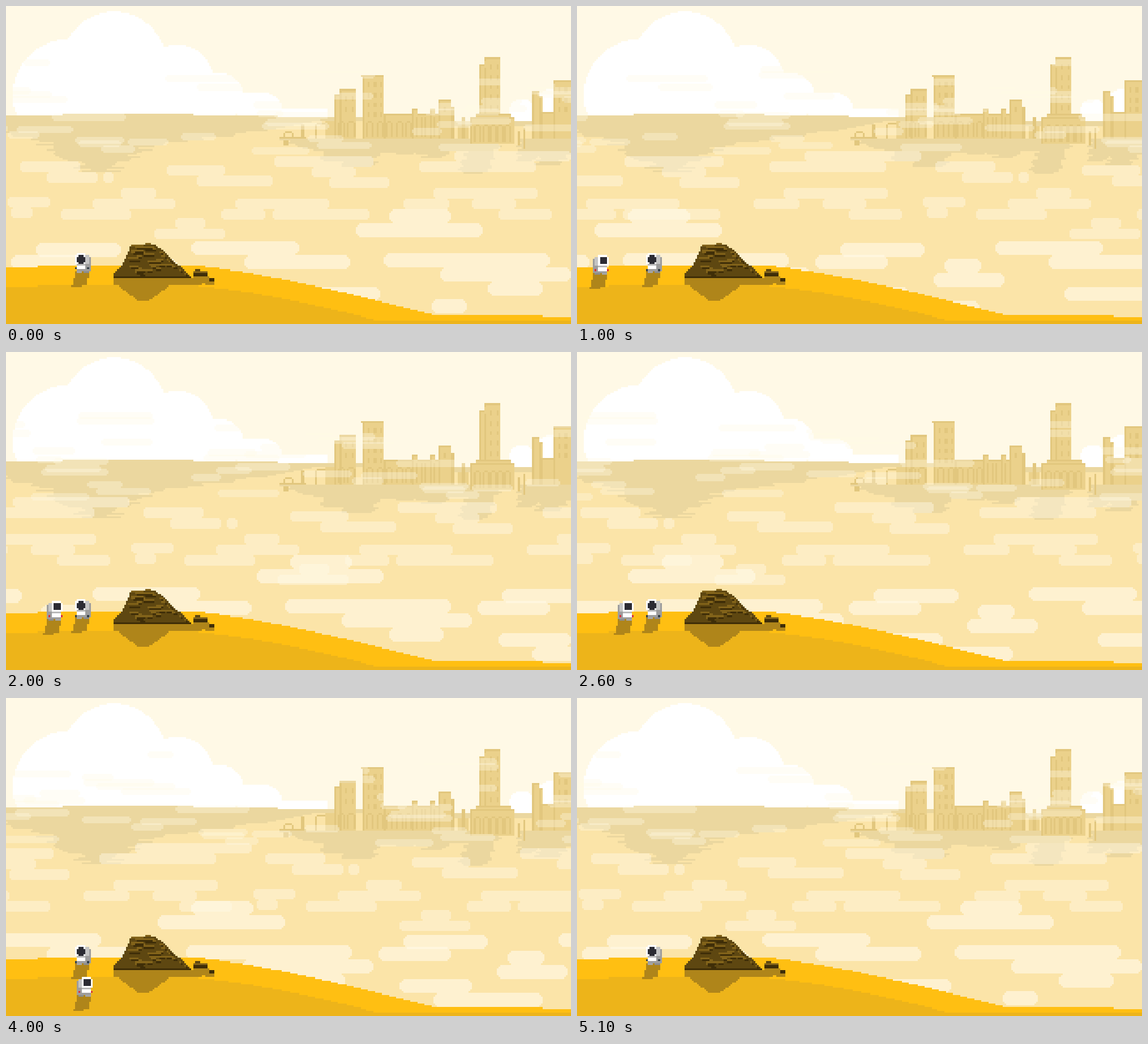
An HTML page with a canvas that plays this animation: 998x561 px, repeating every 5.2 s.

```html
<!DOCTYPE html>
<html lang="en">
<head>
<meta charset="utf-8">
<title>Desert walk</title>
<style>
html, body { margin: 0; width: 100%; height: 100%; overflow: hidden; background: #fff9e6; }
canvas { display: block; width: 998px; height: 561px; image-rendering: pixelated; }
</style>
</head>
<body>
<canvas id="stage" width="320" height="180"></canvas>
<script>
const W = 320, H = 180, UNIT = 998 / W, LAST = 51;
const SKY = '#fff9e6', SAND = '#fbe4a8', BANK = '#ebd79f', WALL = '#ebd18b', TRIM = '#e2c77e';
const DUNE = '#ffbf12', DUNE_LOW = '#edb41a', SHADOW = '#af851a';
const ROCK = '#5e4711', LEDGE = '#82631a', CRACK = '#3f2e08';

const stage = document.getElementById('stage').getContext('2d');
const px = v => Math.round(v / UNIT);
const clamp = v => Math.min(1, Math.max(0, v));

function layer() {
  const c = document.createElement('canvas');
  c.width = W;
  c.height = H;
  return c.getContext('2d');
}

function seeded(s) {
  return () => (s = s * 16807 % 2147483647) / 2147483647;
}

// Rectangle given by its edges in stage units, snapped to the pixel grid.
function box(g, color, x1, y1, x2, y2) {
  const x = px(x1), y = px(y1);
  g.fillStyle = color;
  g.fillRect(x, y, Math.max(1, px(x2) - x), Math.max(1, px(y2) - y));
}

// Piecewise linear curve through [x, y] points.
function curve(pts, x) {
  const i = pts.findIndex(p => p[0] >= x);
  if (i === 0) return pts[0][1];
  if (i < 0) return pts[pts.length - 1][1];
  const [x1, y1] = pts[i - 1], [x2, y2] = pts[i];
  return y1 + (y2 - y1) * (x - x1) / (x2 - x1);
}

// Fill row by row between two edge functions of y.
function rows(g, color, y1, y2, left, right) {
  g.fillStyle = color;
  for (let y = px(y1); y < px(y2); y++) {
    const s = (y + 0.5) * UNIT, a = px(left(s)), b = px(right(s));
    if (b > a) g.fillRect(a, y, b - a, 1);
  }
}

function disc(g, cx, cy, r) {
  const half = y => Math.sqrt(Math.max(0, r * r - (y - cy) ** 2));
  rows(g, '#fff', cy - r, Math.min(cy + r, 203), y => cx - half(y), y => cx + half(y));
}

function drawClouds(g) {
  disc(g, 191, 102, 92);
  disc(g, 110, 157, 98);
  disc(g, 303, 131, 63);
  disc(g, 378, 160, 42);
  disc(g, 453, 188, 36);
  box(g, '#fff', 100, 130, 400, 193);
  box(g, '#fff', 410, 153, 453, 193);
  box(g, '#fff', 470, 181, 568, 197);
  disc(g, 911, 186, 22);
  disc(g, 962, 176, 29);
  box(g, '#fff', 890, 180, 968, 203);
}

const BASE = 234;
// Left edge, roof height and right edge of each tower.
const towers = [
  [580, 156, 592], [590, 147, 617], [630, 122, 668], [668, 190, 790], [717, 181, 727],
  [749, 181, 758], [764, 165, 787], [836, 103, 852], [846, 91, 873],
  [930, 150, 942], [942, 159, 948], [945, 187, 998], [967, 131, 998]
];

function drawGround(g) {
  const rnd = seeded(77);
  const ragged = (f, amount) => y => f(y) + (rnd() - 0.5) * amount;
  box(g, SAND, 0, 203, 998, 561);
  box(g, BANK, 0, 193, 480, 203);
  box(g, BANK, 100, 190, 331, 194);
  box(g, BANK, 480, 196, 640, 203);
  box(g, BANK, 780, 203, 998, 212);

  const left = y => curve([[219, 0], [235, 50], [266, 112], [293, 150]], y);
  const right = y => curve([[203, 545], [222, 450], [242, 270], [266, 215], [293, 196]], y);
  rows(g, BANK, 203, 221, left, right);
  rows(g, BANK, 221, 293, ragged(left, 44), ragged(right, 44));

  // Each tower is mirrored below the skyline, drifting left with depth.
  for (const [x1, top, x2] of towers) {
    const depth = 10 + (BASE - top) * 0.36;
    const drift = y => (y - BASE) * 0.55;
    rows(g, BANK, BASE, BASE + depth,
      ragged(y => x1 - drift(y) - 8, 14), ragged(y => x2 - drift(y) + 6, 14));
  }
  rows(g, BANK, BASE, 256, ragged(y => 480 + (y - BASE) * 3, 24), ragged(y => 890 - (y - BASE) * 2, 24));
  rows(g, BANK, BASE, 262, ragged(() => 908, 14), () => 998);
}

function arch(g, x1, y1, x2, y2) {
  box(g, TRIM, x1, y1 + 6, x1 + 3, y2);
  box(g, TRIM, x2 - 3, y1 + 6, x2, y2);
  box(g, TRIM, x1 + 3, y1 + 3, x2 - 3, y1 + 6);
}

function tower(g, x1, top, x2, base = BASE) {
  box(g, WALL, x1, top, x2, base);
  box(g, TRIM, x1, top, x2, top + 3);
  box(g, TRIM, x1, top, x1 + 3, base);
  if (x2 - x1 < 20 || x2 - x1 > 60) return;
  for (let x = x1 + 9; x < x2 - 6; x += 11)
    for (let y = top + 12; y < base - 45; y += 18) box(g, TRIM, x, y, x + 4, y + 9);
}

function drawCity(g) {
  arch(g, 490, 217, 508, BASE);
  arch(g, 546, 203, 568, BASE);
  box(g, TRIM, 484, 231, 530, 235);
  box(g, TRIM, 490, 237, 499, 247);
  box(g, TRIM, 521, 209, 528, BASE);
  box(g, WALL, 565, 203, 582, BASE);

  for (const t of towers) tower(g, ...t);
  box(g, TRIM, 627, 122, 668, 125);
  box(g, WALL, 846, 97, 852, 110);
  box(g, TRIM, 787, 178, 792, BASE);
  for (let x = 586; x < 720; x += 17)
    if (x < 605 || x > 635) arch(g, x, 200, x + 13, 231);
  for (let x = 716; x < 760; x += 8) box(g, TRIM, x, 197, x + 3, 231);

  box(g, WALL, 799, 213, 817, BASE);
  box(g, TRIM, 805, 197, 811, BASE);
  box(g, WALL, 829, 191, 892, 200);
  box(g, TRIM, 829, 191, 892, 194);
  tower(g, 820, 197, 898, 243);
  for (let x = 828; x < 890; x += 13) arch(g, x, 206, x + 12, 241);
  box(g, TRIM, 905, 222, 909, 246);
  box(g, TRIM, 914, 216, 918, 252);
}

function drawDunes(g) {
  const slope = (x, from, to, power) => clamp((x - from) / (to - from)) ** power;
  const crest = x => 458 + 88 * slope(x, 328, 757, 1.3) + (x < 56 || x > 948 ? 3 : 0);
  const low = x => 492 + 63 * slope(x, 300, 655, 1.5) + (x < 56 ? 3 : 0);
  for (const [edge, color] of [[crest, DUNE], [low, DUNE_LOW]]) {
    g.fillStyle = color;
    for (let x = 0; x < W; x++) g.fillRect(x, px(edge((x + 0.5) * UNIT)), 1, H);
  }
}

function drawRock(g) {
  const rnd = seeded(2024);
  const half = y => 52 - 1.35 * (y - 489);
  rows(g, SHADOW, 489, 521, y => 243 - half(y), y => 243 + half(y));
  box(g, SHADOW, 191, 480, 346, 492);
  box(g, SHADOW, 330, 476, 358, 489);
  box(g, SHADOW, 352, 486, 367, 492);

  const left = y => curve([[421, 221], [430, 218], [455, 206], [474, 190]], y);
  const right = y => curve([[421, 262], [433, 280], [452, 298], [477, 327]], y);
  box(g, LEDGE, 246, 418, 255, 422);
  rows(g, ROCK, 421, 480, left, right);
  // Light ledges, each with a crack below.
  for (let i = 0; i < 38; i++) {
    const y = 423 + rnd() * 48, a = left(y) + 4, b = right(y) - 5;
    const x = a + rnd() * (b - a), end = Math.min(b, x + 8 + rnd() * 20);
    box(g, LEDGE, x, y, end, y + 3);
    box(g, CRACK, x + 4, y + 3.2, end, y + 6);
  }
  box(g, LEDGE, 222, 421, 243, 424);
  box(g, CRACK, 190, 476, 328, 480);
  box(g, ROCK, 334, 464, 344, 470);
  box(g, LEDGE, 331, 468, 354, 472);
  box(g, CRACK, 331, 472, 357, 477);
  box(g, CRACK, 358, 480, 368, 486);
}

// Faint distant fog: scattered pills [x, centre y, length] in rising order of depth.
function scatter(count) {
  const rnd = seeded(4151);
  return Array.from({ length: count }, (_, i) =>
    [rnd() * 998, 99 + 160 * (i / count) ** 0.7, 45 + rnd() * 100]);
}

const middle = [
  [792, 264, 207], [474, 274, 175], [24, 283, 107], [730, 283, 206], [284, 290, 103], [540, 293, 77],
  [72, 302, 90], [171, 302, 19], [337, 309, 134], [571, 312, 106], [203, 330, 62], [755, 330, 183],
  [3, 346, 75], [153, 349, 146], [405, 349, 166], [703, 349, 80], [823, 349, 78], [9, 365, 38],
  [97, 368, 125], [380, 368, 79], [471, 368, 172], [870, 368, 94], [300, 383, 52], [262, 402, 125]
];
const near = [
  [678, 371, 107], [618, 396, 223], [328, 427, 189], [53, 430, 150], [668, 449, 292], [10, 452, 127],
  [422, 452, 186], [237, 458, 65], [768, 474, 231], [219, 482, 124], [852, 498, 96], [450, 507, 211],
  [47, 507, 128], [752, 530, 62], [107, 533, 192]
];

// Pills of height h on a sheet that wraps sideways; it passes `wraps` times per loop.
function fog(pills, h, alpha, wraps) {
  const g = layer(), r = h / 2;
  g.fillStyle = `rgba(255,249,230,${alpha})`;
  for (const [x, cy, len] of pills) {
    const a = px(x), w = px(x + len) - a, top = Math.round(cy / UNIT - r);
    for (let i = 0; i < h; i++) {
      const cut = Math.round(r - Math.sqrt(r * r - (i + 0.5 - r) ** 2));
      for (const shift of [0, W]) g.fillRect(a + cut - shift, top + i, w - 2 * cut, 1);
    }
  }
  return { sheet: g.canvas, wraps };
}

const fogs = [fog(scatter(36), 4, 0.35, 1), fog(middle, 6, 0.45, 2), fog(near, 8, 0.64, 3)];

// Small figure; side is 1 facing right, -1 facing left.
function astronaut(g, x, y, side, stride, arm, glove) {
  const part = (color, dx, dy, w, h) => {
    g.fillStyle = color;
    g.fillRect(x + (side > 0 ? dx : 9 - dx - w), y + dy, w, h);
  };
  g.fillStyle = SHADOW;
  for (let i = 0; i < 9; i++) g.fillRect(x - Math.floor(i / 4), y + 10 + i, i > 7 ? 6 : 8, 1);
  part('#9d9d9d', 0, 2, 3, 8);
  part('#c4c4c4', 1, 1, 2, 5);
  part('#fff', 3, 0, 5, 7);
  part('#fff', 3, 1, 6, 5);
  if (side > 0) {
    part('#2c2c34', 4, 1, 4, 4);
  } else {
    part('#2c2c34', 3, 2, 5, 3);
    part('#2c2c34', 4, 1, 3, 5);
  }
  part('#b9b9b9', 3, 6, 5, 1);
  part('#fff', 3, 7, 5, 2);
  part('#9d9d9d', 2, 9, 6, 1);
  part('#8c8c8c', 1 + stride, 10, 3, 1);
  part('#a6a6a6', 5 - stride, 10, 3, 1);
  part(glove, 8, arm, 1, 1);
  part(glove, 1, arm, 1, 1);
}

// Walks in, waits beside the other figure, then leaves down the slope.
function walker(t) {
  const walkIn = Math.min(23, Math.round(2 * t - 11));
  const away = Math.max(0, Math.round(1.9 * (t - 31)));
  return { x: walkIn + away, y: 141 + away, stride: t < 17 || t > 31 ? t % 2 : 0 };
}

const back = layer(), front = layer();
box(back, SKY, 0, 0, 998, 561);
drawClouds(back);
box(back, SAND, 568, 197, 790, 204);
drawGround(back);
drawCity(back);
drawDunes(front);
drawRock(front);

function draw(t) {
  stage.drawImage(back.canvas, 0, 0);
  for (const { sheet, wraps } of fogs) {
    const off = Math.floor(W * wraps * t / LAST) % W;
    stage.drawImage(sheet, -off, 0);
    stage.drawImage(sheet, W - off, 0);
  }
  stage.drawImage(front.canvas, 0, 0);
  astronaut(stage, 39, 140, -1, 0, t % LAST < 3 ? 8 : 9, '#33404a');
  if (t < LAST) {
    const p = walker(t);
    astronaut(stage, p.x, p.y, 1, p.stride, 8, '#d8313c');
  }
}

let shown = -1;
const start = performance.now();
function tick(now) {
  const t = Math.floor(Math.max(0, now - start) % 5200 / 100);
  if (t !== shown) draw(shown = t);
  requestAnimationFrame(tick);
}
draw(0);
requestAnimationFrame(tick);
</script>
</body>
</html>
```
